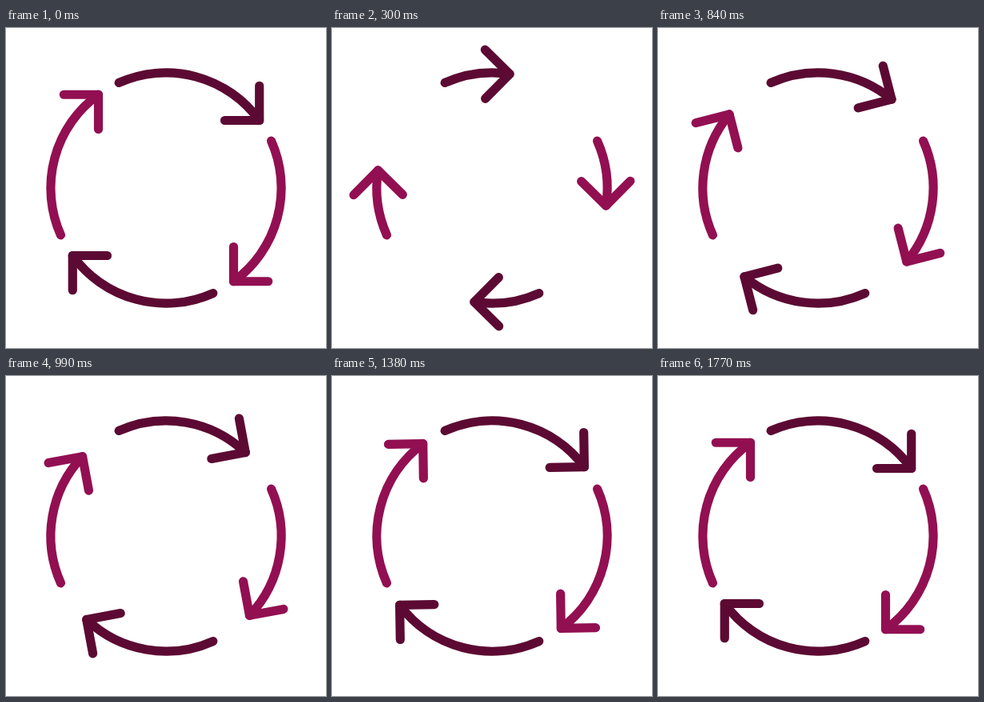
An HTML page with a canvas for the animation above (3830 ms loop, 400x400 px).

```html
<!DOCTYPE html>
<html lang="en">
<head>
<meta charset="utf-8">
<title>Cycle arrows</title>
<style>
  html, body { margin: 0; width: 100%; height: 100%; overflow: hidden; background: #fff; }
  canvas { display: block; width: 100vmin; height: 100vmin; }
</style>
</head>
<body>
<canvas id="stage"></canvas>
<script>
const SIZE = 400, LOOP = 3830, STEP = 30, LAST = 1770;
const RADIUS = 144.1, BARB = 43.2, WIDTH = 11.2;
const TAIL = -24.1, TILT = -9.1;
const DARK = '#5c0a33', PINK = '#920f52';
const DEG = Math.PI / 180;

// [ms, tip angle in degrees clockwise from the top of the ring]
const KEYS = [
  [0, 54.1], [120, 25.6], [420, 4.5], [600, 6.2],
  [840, 39.7], [1140, 46.4], [1380, 53.2], [1770, 54.1]
];

const secant = i => (KEYS[i + 1][1] - KEYS[i][1]) / (KEYS[i + 1][0] - KEYS[i][0]);

// Slopes that keep the curve free of overshoot between keys
const slopes = KEYS.map((_, i) => {
  if (i === 0 || i === KEYS.length - 1) return 0;
  const a = secant(i - 1), b = secant(i);
  return a * b <= 0 ? 0 : 2 * a * b / (a + b);
});

function tipAngle(t) {
  let i = 0;
  while (i < KEYS.length - 2 && t > KEYS[i + 1][0]) i++;
  const [t0, v0] = KEYS[i], [t1, v1] = KEYS[i + 1];
  const span = t1 - t0, u = (t - t0) / span, w = 1 - u;
  return v0 * (1 + 2 * u) * w * w + v1 * u * u * (3 - 2 * u)
    + span * (slopes[i] * u * w * w - slopes[i + 1] * u * u * w);
}

const canvas = document.getElementById('stage');
const ctx = canvas.getContext('2d');

function fit() {
  const side = Math.min(innerWidth, innerHeight) * (devicePixelRatio || 1);
  canvas.width = canvas.height = Math.round(side);
}

function drawArrow(turn, tip, color) {
  ctx.save();
  ctx.rotate(turn * DEG);
  ctx.strokeStyle = color;
  ctx.beginPath();
  ctx.arc(0, 0, RADIUS, (TAIL - 90) * DEG, (tip - 90) * DEG);
  ctx.stroke();

  // The head's barbs point up and left when its total rotation is zero
  ctx.rotate(tip * DEG);
  ctx.translate(0, -RADIUS);
  ctx.rotate((TILT - 45) * DEG);
  ctx.beginPath();
  ctx.moveTo(0, -BARB);
  ctx.lineTo(0, 0);
  ctx.lineTo(-BARB, 0);
  ctx.stroke();
  ctx.restore();
}

function draw(t) {
  const scale = canvas.width / SIZE;
  ctx.setTransform(scale, 0, 0, scale, 0, 0);
  ctx.fillStyle = '#fff';
  ctx.fillRect(0, 0, SIZE, SIZE);
  ctx.translate(SIZE / 2, SIZE / 2);
  ctx.lineWidth = WIDTH;
  ctx.lineCap = ctx.lineJoin = 'round';
  const tip = tipAngle(Math.min(Math.floor(t / STEP) * STEP, LAST));
  for (let i = 0; i < 4; i++) drawArrow(i * 90, tip, i % 2 ? PINK : DARK);
}

const start = performance.now();

function tick() {
  draw((performance.now() - start) % LOOP);
  requestAnimationFrame(tick);
}

addEventListener('resize', fit);
fit();
tick();
</script>
</body>
</html>
```
